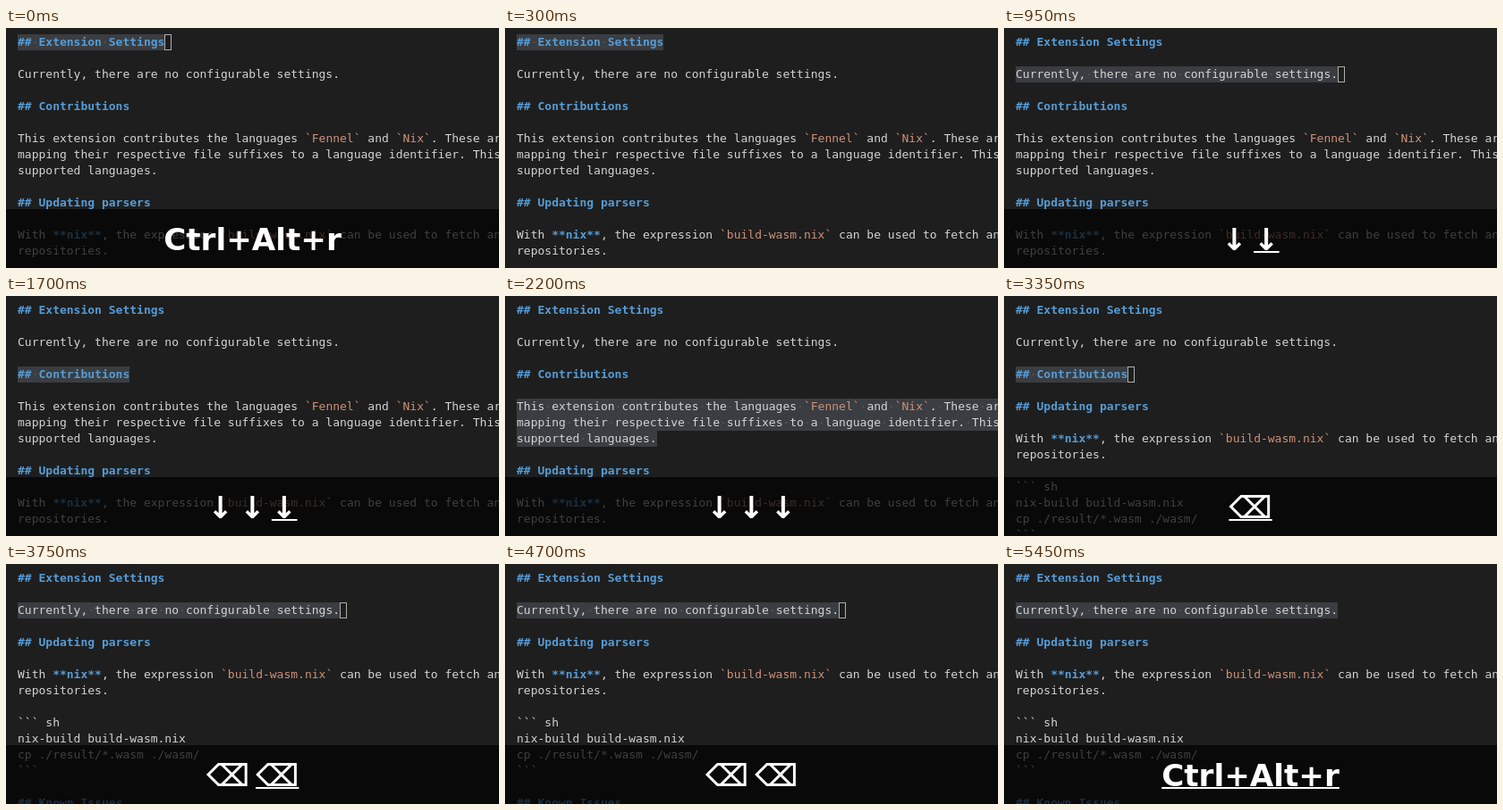
Write an HTML page that moves like this. It is 551x269 px and loops after 5500 ms.

```html
<!DOCTYPE html>
<html lang="en">
<head>
<meta charset="utf-8">
<title>Selecting and removing paragraphs</title>
<style>
  html, body { margin: 0; width: 100%; height: 100%; overflow: hidden; background: #1e1e1e; }
  #stage { position: relative; width: 100%; height: 100%; overflow: hidden; contain: strict; }
  #editor {
    position: absolute; left: 13px; top: 7px; right: 0; bottom: 0; overflow: hidden;
    font: 13px/18px "DejaVu Sans Mono", monospace;
    color: #d4d4d4; white-space: pre;
  }
  #editor div { height: 18px; }
  #editor b { color: #569cd6; }
  #editor code { font: inherit; color: #ce9178; }
  #editor i { font-style: normal; font-weight: normal; color: #e3e4e229; }
  .selected { display: inline-block; height: 18px; position: relative; vertical-align: top; background: #3a3d41; }
  .caret::after {
    content: ""; position: absolute; left: 100%; top: 0;
    box-sizing: border-box; width: 8px; height: 18px; border: 1px solid #aeafad;
  }
  #keys {
    position: absolute; left: 0; right: 0; top: 203px; bottom: 0; overflow: hidden;
    display: flex; justify-content: center; gap: 7px;
    background: rgba(0, 0, 0, .7); color: #fff;
    font: bold 34.2px/68px "DejaVu Sans", sans-serif;
  }
  #keys[hidden] { display: none; }
  #keys u { text-decoration-thickness: 2px; text-underline-offset: 1px; text-decoration-skip-ink: none; }
</style>
</head>
<body>
<div id="stage">
  <div id="editor"></div>
  <div id="keys"></div>
</div>
<script>
const LOOP = 5500;
const editor = document.getElementById('editor');
const keyBar = document.getElementById('keys');

const blocks = `## Extension Settings

Currently, there are no configurable settings.

## Contributions

This extension contributes the languages \`Fennel\` and \`Nix\`. These are
mapping their respective file suffixes to a language identifier. This
supported languages.

## Updating parsers

With **nix**, the expression \`build-wasm.nix\` can be used to fetch and
repositories.

\`\`\` sh
nix-build build-wasm.nix
cp ./result/*.wasm ./wasm/
\`\`\`

## Known Issues`.split('\n\n').map(block => block.split('\n'));

// Each step lists only what changes. Blocks from `cut` up to 3 are deleted.
const shortcut = ['Ctrl+Alt+r'];
const press = (key, count) => ({ keys: Array(count).fill(key), fresh: true });
const steps = [
  [0, { sel: 0, cut: 4, caret: true, keys: shortcut, fresh: false }],
  [100, { keys: [] }],
  [300, { caret: false }],
  [600, press('↓', 1)],
  [650, { sel: 1, caret: true }],
  [800, { fresh: false }],
  [950, press('↓', 2)],
  [1000, { sel: 2 }],
  [1150, { fresh: false }],
  [1550, { caret: false }],
  [1700, press('↓', 3)],
  [1750, { sel: 3, caret: true }],
  [1950, { fresh: false }],
  [2200, { caret: false }],
  [2750, { caret: true }],
  [2950, { keys: [] }],
  [3300, { ...press('⌫', 1), caret: false }],
  [3350, { sel: 2, cut: 3, caret: true }],
  [3450, { fresh: false }],
  [3700, press('⌫', 2)],
  [3750, { sel: 1, cut: 2 }],
  [3900, { fresh: false }],
  [4200, { caret: false }],
  [4700, { caret: true }],
  [4900, { keys: [] }],
  [5200, { caret: false }],
  [5450, { keys: shortcut, fresh: true }],
];

const highlight = line => line
  .replace(/^#.*|\*\*\w+\*\*/g, '<b>$&</b>')
  .replace(/`[^`]+`/g, '<code>$&</code>');

function lineHtml(line, selected, caret) {
  const html = highlight(line);
  if (!selected) return `<div>${html}</div>`;
  const dotted = html.replace(/ /g, '<i>·</i>');
  return `<div><span class="selected${caret ? ' caret' : ''}">${dotted}</span></div>`;
}

function render({ sel, cut, caret, keys, fresh }) {
  editor.innerHTML = blocks
    .map((lines, i) => i >= cut && i < 4 ? '' : lines.map((line, n) =>
      lineHtml(line, i === sel, caret && n === lines.length - 1)).join(''))
    .filter(Boolean)
    .join('<div></div>');
  keyBar.hidden = !keys.length;
  keyBar.innerHTML = keys.map((key, i) => {
    const tag = fresh && i === keys.length - 1 ? 'u' : 'span';
    return `<${tag}>${key}</${tag}>`;
  }).join('');
}

let shown = 0;
const start = performance.now();

function frame() {
  const t = Math.max(0, performance.now() - start) % LOOP;
  const count = steps.filter(([time]) => time <= t).length;
  if (count !== shown) {
    shown = count;
    render(Object.assign({}, ...steps.slice(0, count).map(step => step[1])));
  }
  requestAnimationFrame(frame);
}
frame();
</script>
</body>
</html>
```
